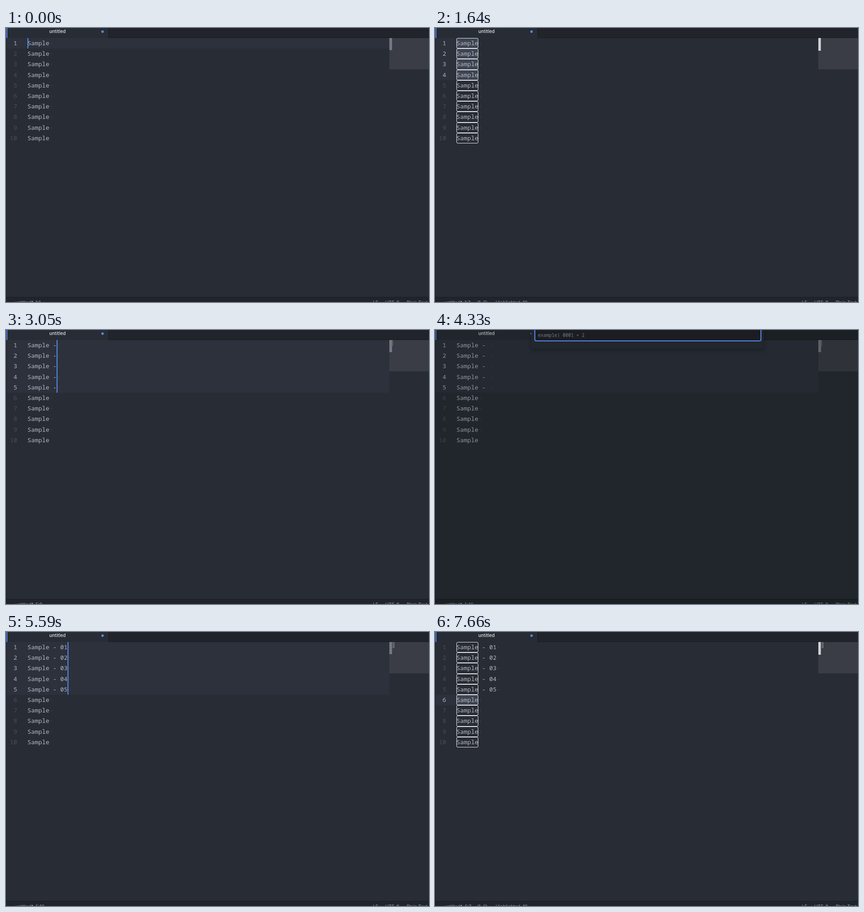
An HTML page that plays this animation: 928 px wide and 603 px high, repeating every 7990 ms.

```html
<!DOCTYPE html>
<html lang="en">
<head>
<meta charset="utf-8">
<title>Editor</title>
<style>
  html, body { margin: 0; width: 100%; height: 100%; overflow: hidden; background: #282c34; }
  svg { display: block; }
  text { white-space: pre; }
  .code { font: 13.333px "Noto Sans Mono", monospace; fill: #b0b6c2; }
  .mark { font: 10px "Noto Sans Mono", monospace; fill: #3d424c; }
  .field { font: 10px "Noto Sans Mono", monospace; }
  .ui { font: 10px Inter, sans-serif; fill: #9da5b4; }
</style>
</head>
<body>
<svg id="stage" width="928" height="603" viewBox="0 0 928 603"></svg>
<script>
const LOOP = 7990, ROWS = 10, LEFT = 47, CELL = 8;
const BLUE = '#568af2', LINE = '#181a1f', BAR = '#21252b', ACTIVE = '#2c313c';
const svg = document.getElementById('stage');

// Each step changes only the listed parts of the state before it.
const steps = [
  [0, { first: 0, last: 0, col: 0, on: 1, tail: '', pos: '1:1', dim: 0, lit: 1 }],
  [60, { on: 0 }],
  [450, { sel: 1, col: 6 }],
  [560, { boxes: 1, pos: '1:7' }],
  [1160, { last: 1 }],
  [1400, { last: 2 }],
  [1640, { last: 3 }],
  [1880, { last: 4 }],
  [2240, { sel: 0, boxes: 0, on: 1, pos: '5:7' }],
  [2420, { on: 0 }],
  [2810, { on: 1, tail: ' ', col: 7, pos: '5:8' }],
  [2990, { tail: ' -', col: 8, pos: '5:9' }],
  [3130, { tail: ' - ', col: 9, pos: '5:10' }],
  [3550, { on: 0 }],
  [3970, { on: 1 }],
  [4330, { on: 0, dim: .2, input: '' }],
  [4390, { dim: .4, lit: 0, caret: 1 }],
  [4750, { input: '0' }],
  [4870, { input: '01' }],
  [5290, { caret: 0 }],
  [5590, { dim: 0, lit: 1, on: 1, tail: ' - 0', numbered: 1, col: 11, pos: '5:12' }],
  [6000, { on: 0 }],
  [6360, { on: 1 }],
  [6420, { last: 0 }],
  [6600, { first: 1, last: 1, pos: '2:12' }],
  [6840, { first: 2, last: 2, pos: '3:12' }],
  [7070, { first: 3, last: 3, pos: '4:12' }],
  [7220, { first: 4, last: 4, pos: '5:12' }],
  [7370, { first: 5, last: 5, col: 6, pos: '6:7' }],
  [7660, { on: 0, sel: 1, boxes: 1 }]
];
let state = {};
const states = steps.map(([, change]) => state = { ...state, ...change });

const rect = (x, y, w, h, fill, more = '') =>
  `<rect x="${x}" y="${y}" width="${w}" height="${h}" fill="${fill}" ${more}/>`;
const text = (x, y, kind, str, more = '') =>
  `<text x="${x}" y="${y}" class="${kind}" ${more}>${str}</text>`;
const rowTop = row => Math.round(22 + 23.2 * row);

function drawRow(s, row) {
  const y = rowTop(row), h = rowTop(row + 1) - y, base = 38 + 23.2 * row;
  const active = row >= s.first && row <= s.last;
  const tail = row > 4 ? '' : s.numbered ? s.tail + (row + 1) : s.tail;
  let out = '';
  if (active && s.lit) out += rect(1, y, s.sel ? 46 : 840, h, ACTIVE);
  if (active && s.sel) out += rect(LEFT, y, 48, h, '#3e4451', 'rx="2"');
  if (s.boxes) out += rect(LEFT + .5, y + .5, 47, h - 1, 'none', 'rx="2.5" stroke="#e6e8eb"');
  out += text(24.5, base, 'code', row + 1,
    `text-anchor="end" style="fill:${active ? '#abb2bf' : '#484e5a'}"`);
  out += text(LEFT, base, 'code', 'Sample' + tail);

  const end = LEFT + CELL * (6 + tail.length);
  if (tail.endsWith(' ')) out += text(end - 7, base - 1, 'mark', '·');
  if (row < ROWS - 1) out += text(end + 1, base - 1, 'mark', '¬');
  if (active && s.on) out += rect(LEFT + CELL * s.col, y, 2, h, BLUE);

  // Minimap: one pixel per character.
  const my = 22.5 + 2.667 * row;
  if (!s.boxes) out += rect(841, my, 6, 1.8, '#8f949d');
  [...tail].forEach((c, i) => {
    if (c !== ' ') out += rect(847 + i, my, 1, 1.8, '#8f949d');
  });
  return out;
}

function drawModal(s) {
  const full = s.dim > .3;
  let out = rect(211, -9, 510, 50, full ? '#282c35' : '#22262d',
    'rx="4" style="filter:drop-shadow(0 3px 4px rgba(0,0,0,.3))"');
  out += rect(219, -9, 496, 33, '#1b1d23', `rx="3" stroke="${BLUE}" stroke-width="2"`);
  out += text(226, 15, 'field', s.input || 'example) 0001 + 2',
    `fill="${s.input ? '#e1e4e9' : '#777c85'}"`);
  if (s.caret) out += rect(226 + 6 * s.input.length, 4, 1, 14, '#d7dae0');
  return out;
}

function draw(s) {
  let out = rect(0, 0, 928, 603, '#282c34');
  out += rect(226, 0, 702, 21, BAR) + rect(225, 0, 1, 22, LINE) + rect(225, 21, 703, 1, LINE);
  out += rect(1, 0, 2, 22, BLUE);
  out += text(113, 10.5, 'ui', 'untitled', 'text-anchor="middle" style="fill:#e0e3e8;font-weight:500"');
  out += `<circle cx="211.8" cy="8" r="2.7" fill="${BLUE}"/>`;

  out += rect(841, 22, 87, 69, '#3a3d45');
  if (s.boxes) out += rect(841, 22, 5.5, 28, '#d0d2d6');
  for (let row = 0; row < ROWS; row++) out += drawRow(s, row);

  out += rect(0, 592, 928, 1, LINE) + rect(0, 593, 928, 10, BAR);
  const label = (x, str) => text(x, 608.3, 'ui', str);
  out += label(20, 'untitled*') + label(65, s.pos);
  if (s.boxes) out += label(92, '(1, 6)') + label(133, 'Highlighted: 10');
  out += label(805, 'LF') + label(832, 'UTF-8') + label(879, 'Plain Text');
  out += rect(0, 0, 1, 603, LINE);

  if (s.dim) out += rect(0, 0, 928, 603, '#080a0c', `opacity="${s.dim}"`) + drawModal(s);
  svg.innerHTML = out;
}

let shown = -1;
function tick() {
  const t = performance.now() % LOOP;
  const now = steps.filter(([at]) => at <= t).length - 1;
  if (now !== shown) draw(states[shown = now]);
  requestAnimationFrame(tick);
}
tick();
</script>
</body>
</html>
```
